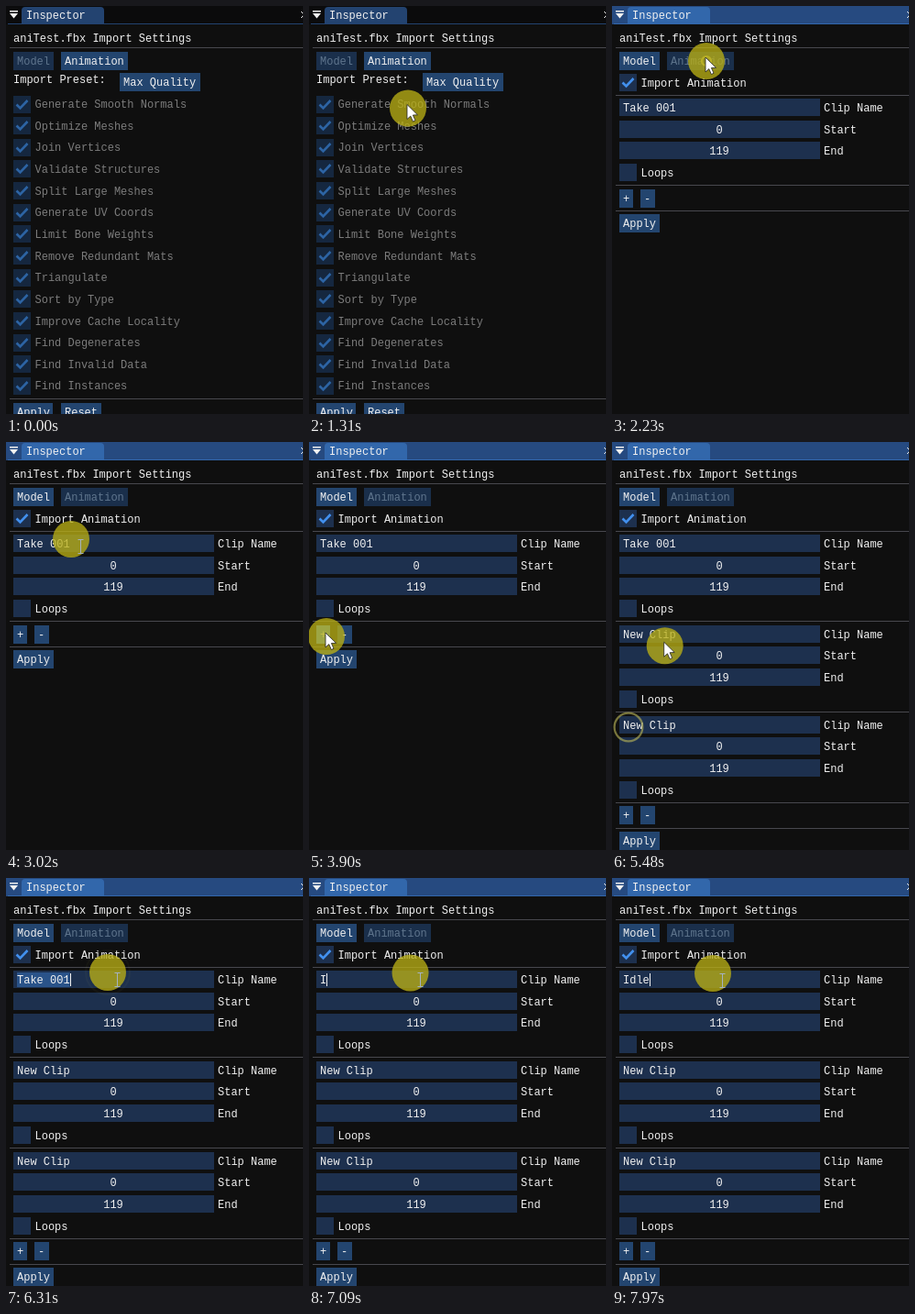
Recreate the animation shown at these times as an HTML page with a canvas. Size 324x445 px, loop 8 s.

```html
<!DOCTYPE html>
<html lang="en">
<head>
<meta charset="utf-8">
<title>Import settings inspector</title>
<style>
html, body { margin: 0; width: 324px; height: 445px; overflow: hidden; background: #0f0f0f; }
canvas { display: block; }
</style>
</head>
<body>
<canvas id="stage" width="324" height="445"></canvas>
<script>
const g = document.getElementById('stage').getContext('2d');
const LOOP = 8000, ROW = 23.65, CLIP = 98.8;
const C = {
  bg: '#0f0f0f', line: '#48484e', text: '#f0f0f0', dim: '#7c7c7c',
  frame: '#1d304e', frameDim: '#15273f', frameHot: '#234877',
  button: '#23456f', buttonDim: '#1a2f4b', buttonHot: '#3d88e0', buttonDown: '#0f78e0',
  check: '#4290ee', checkDim: '#2d64a4', select: '#2a5389'
};
const OPTIONS = ['Generate Smooth Normals', 'Optimize Meshes', 'Join Vertices',
  'Validate Structures', 'Split Large Meshes', 'Generate UV Coords', 'Limit Bone Weights',
  'Remove Redundant Mats', 'Triangulate', 'Sort by Type', 'Improve Cache Locality',
  'Find Degenerates', 'Find Invalid Data', 'Find Instances'];

// pointer path: time, x, y
const PATH = [[250, 112, 475], [620, 140, 200], [1000, 125, 95], [1310, 108, 111.5],
  [1850, 103, 60], [2230, 103, 60], [3020, 71, 106], [3400, 60, 140], [3800, 19, 212],
  [4450, 19, 212], [4670, 30.5, 260.5], [4950, 18, 311], [5260, 18, 311], [5750, 111, 103],
  [6310, 111, 103], [7900, 110, 104]];
const CLICKS = [2150, 4390, 5230, 5780, 5920];
const FOCUS = 2000, PRESS = 110;
const SWITCH = 2150, ADD = [4390, 5230], PICK = 5780, SELECT = 5920;
const KEYS = [7000, 7180, 7340, 7500];

let mouse, down;

function pointer(t) {
  if (t <= PATH[0][0]) return { x: PATH[0][1], y: PATH[0][2] };
  for (let i = 1; i < PATH.length; i++) {
    const a = PATH[i - 1], b = PATH[i];
    if (t < b[0]) {
      const u = (t - a[0]) / (b[0] - a[0]), s = u * u * (3 - 2 * u);
      return { x: a[1] + (b[1] - a[1]) * s, y: a[2] + (b[2] - a[2]) * s };
    }
  }
  const end = PATH[PATH.length - 1];
  return { x: end[1], y: end[2] };
}

function clipCount(t) {
  return t < SWITCH ? 0 : 1 + ADD.filter(a => t >= a).length;
}

function rect(x, y, w, h, color) {
  g.fillStyle = color;
  g.fillRect(x, y, w, h);
}

function text(s, x, cy, color = C.text, align = 'left') {
  g.textAlign = align;
  g.fillStyle = color;
  g.fillText(s, x, Math.round(cy) + 4);
}

function rule(y) { rect(4, Math.round(y), 320, 1, C.line); }

function over(x, y, w, h) {
  const px = mouse.x - 1, py = mouse.y - 3;
  return px >= x && px < x + w && py >= y && py < y + h;
}

function button(s, x, y, w, off) {
  const hot = !off && over(x, y, w, 19.5);
  rect(x, Math.round(y), w, 20, off ? C.buttonDim : hot ? (down ? C.buttonDown : C.buttonHot) : C.button);
  text(s, x + 4, y + 10, off ? '#5f758d' : C.text);
}

function checkbox(s, cy, on, off) {
  const y = Math.round(cy - 9.5);
  rect(8, y, 19, 19, off ? C.frameDim : over(8, y, 19, 19) ? C.frameHot : C.frame);
  if (on) {
    g.strokeStyle = off ? C.checkDim : C.check;
    g.lineWidth = 2.6;
    g.beginPath();
    g.moveTo(11.5, y + 9.5);
    g.lineTo(15.5, y + 13.5);
    g.lineTo(23.5, y + 5);
    g.stroke();
  }
  text(s, 31.5, cy, off ? C.dim : C.text);
}

function header(t) {
  const lit = t >= FOCUS;
  const tab = lit ? '#3267ab' : '#234370';
  rect(0, 0, 324, 20, lit ? '#264a80' : '#0b0b0c');
  g.fillStyle = tab;
  g.beginPath();
  g.roundRect(17, 1, 90, 19, [4, 4, 0, 0]);
  g.fill();
  rect(2, 19, 322, 1, tab);
  rect(4, 5, 9, 1.5, C.text);
  g.fillStyle = C.text;
  g.beginPath();
  g.moveTo(4, 8);
  g.lineTo(13, 8);
  g.lineTo(8.5, 13.5);
  g.fill();
  text('Inspector', 22, 10);
  g.strokeStyle = C.text;
  g.lineWidth = 1;
  g.beginPath();
  g.moveTo(322, 6);
  g.lineTo(328.5, 13);
  g.moveTo(322, 13);
  g.lineTo(328.5, 6);
  g.stroke();
  text('aniTest.fbx Import Settings', 8, 35);
  rule(45);
}

function modelPage() {
  button('Model', 8, 50, 44, true);
  button('Animation', 60, 50, 73, false);
  text('Import Preset:', 8, 80);
  button('Max Quality', 124, 73, 88, false);
  OPTIONS.forEach((s, i) => checkbox(s, 107 + i * ROW, true, true));
  rule(428);
  button('Apply', 8, 433, 43, false);
  button('Reset', 60, 433, 44, false);
}

function nameField(t, y) {
  const typed = KEYS.filter(k => t >= k).length;
  const name = typed ? 'Idle'.slice(0, typed) : 'Take 001';
  const w = g.measureText(name).width;
  if (t >= SELECT && !typed) rect(12, y + 2, w, 16, C.select);
  text(name, 12, y + 10);
  if (t >= PICK) {
    const last = typed ? KEYS[typed - 1] : SELECT;
    if ((t - last) % 1200 < 800) rect(Math.round(12 + w), y + 3, 1, 14, C.text);
  }
}

function clip(t, i) {
  const top = 101 + i * CLIP;
  ['Clip Name', 'Start', 'End'].forEach((label, k) => {
    const y = Math.round(top + k * ROW);
    rect(8, y, 219, 19, k && over(8, y, 219, 19) ? C.frameHot : C.frame);
    text(label, 231, y + 10);
    if (k) text(k === 1 ? '0' : '119', 117, y + 10, C.text, 'center');
    else if (i) text('New Clip', 12, y + 10);
    else nameField(t, y);
  });
  checkbox('Loops', top + 3 * ROW + 10, false, false);
  rule(top + 94);
}

function animationPage(t) {
  const count = clipCount(t);
  button('Model', 8, 50, 44, false);
  button('Animation', 60, 50, 73, true);
  checkbox('Import Animation', 83.5, true, false);
  rule(97);
  for (let i = 0; i < count; i++) clip(t, i);
  const y = 101 + count * CLIP;
  button('+', 8, y, 15, false);
  button('-', 31, y, 16, false);
  rule(y + 23.5);
  button('Apply', 8, y + 27.5, 44, false);
}

function ripples(t) {
  for (const c of CLICKS) {
    const age = (t - c) / 400;
    if (age <= 0 || age >= 1) continue;
    const p = pointer(c);
    g.strokeStyle = `rgba(190,185,90,${1 - age * age})`;
    g.lineWidth = 2.2;
    g.beginPath();
    g.arc(p.x, p.y, 24.5 * age, 0, Math.PI * 2);
    g.stroke();
  }
}

function arrow(x, y) {
  const pts = [[0, 16], [3.8, 12.6], [6.4, 18.5], [9, 17.3], [6.4, 11.5], [11.5, 11.3]];
  g.beginPath();
  g.moveTo(x, y);
  for (const [dx, dy] of pts) g.lineTo(x + dx, y + dy);
  g.closePath();
  g.fillStyle = '#fff';
  g.fill();
  g.strokeStyle = '#222';
  g.lineWidth = 0.8;
  g.stroke();
}

function beam(x, y) {
  g.strokeStyle = '#a4b2c0';
  g.lineWidth = 1;
  g.beginPath();
  g.moveTo(x - 3, y - 7.5);
  g.lineTo(x + 3, y - 7.5);
  g.moveTo(x, y - 7);
  g.lineTo(x, y + 7);
  g.moveTo(x - 3, y + 7.5);
  g.lineTo(x + 3, y + 7.5);
  g.stroke();
}

function cursor(t) {
  g.fillStyle = 'rgba(186,176,22,0.77)';
  g.beginPath();
  g.arc(mouse.x, mouse.y, 20, 0, Math.PI * 2);
  g.fill();
  let editing = false;
  for (let i = 0; i < clipCount(t); i++) editing = editing || over(8, 98 + i * CLIP, 219, 21);
  if (editing) beam(Math.round(mouse.x) + 10.5, Math.round(mouse.y) + 8);
  else arrow(mouse.x - 1, mouse.y - 4);
}

function draw(t) {
  mouse = pointer(t);
  down = CLICKS.some(c => t >= c - PRESS && t < c);
  rect(0, 0, 324, 445, C.bg);
  g.font = '12px "Liberation Mono", monospace';
  header(t);
  if (t < SWITCH) modelPage();
  else animationPage(t);
  ripples(t);
  cursor(t);
}

const start = performance.now();
function tick(now) {
  draw(Math.max(0, now - start) % LOOP);
  requestAnimationFrame(tick);
}
draw(0);
requestAnimationFrame(tick);
</script>
</body>
</html>
```
